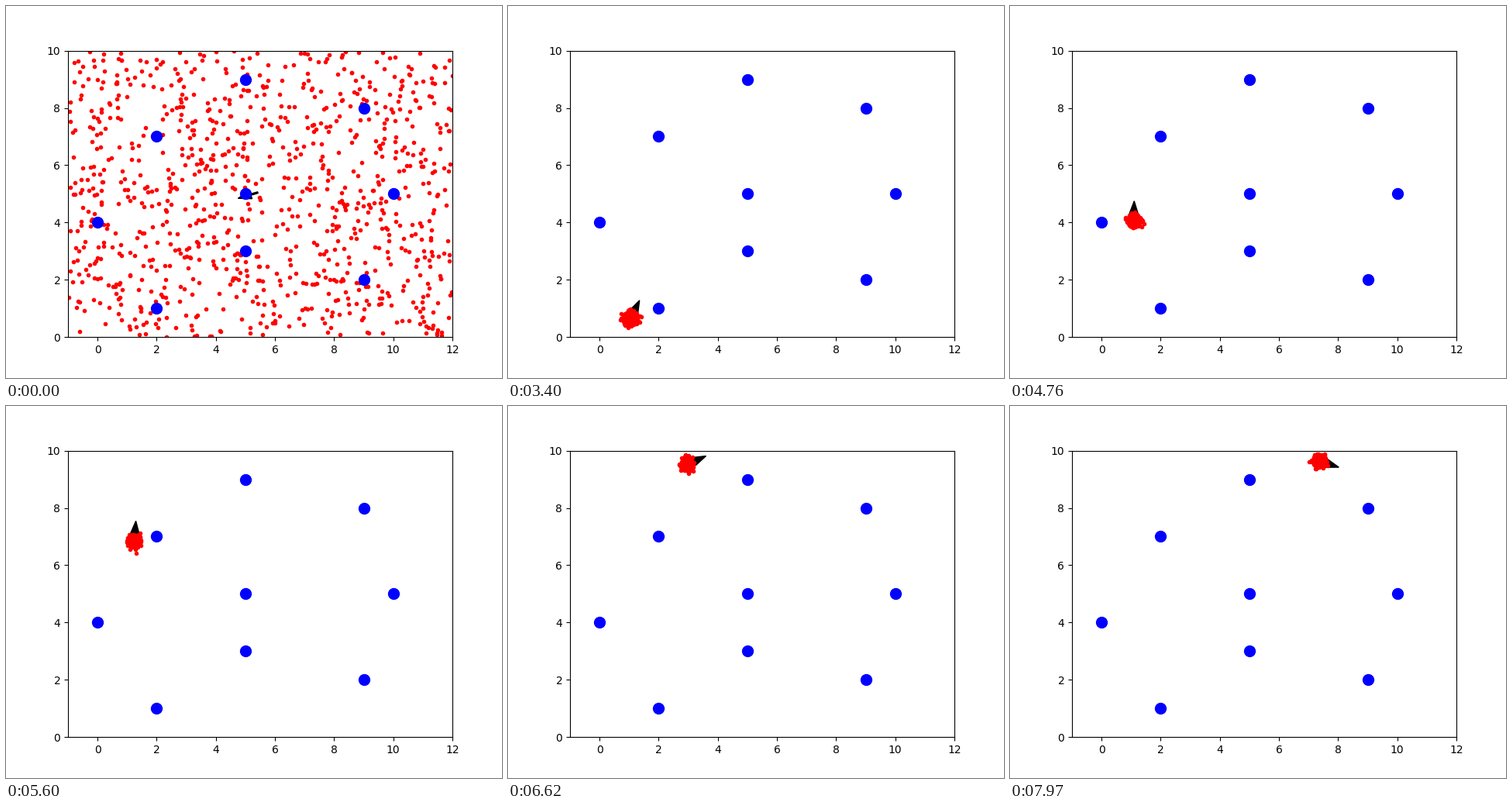
A matplotlib script for the animation above (8 s loop, 640 px wide and 480 px high).

```python
import numpy as np
import matplotlib.pyplot as plt
from matplotlib.animation import FuncAnimation

TICK, LOOP = 20, 8000
LANDMARKS = [(0, 4), (2, 7), (2, 1), (5, 3), (5, 5), (5, 9), (9, 8), (9, 2), (10, 5)]

# The filter steps slowly at first, then speeds up.
STARTS = np.cumsum(np.repeat([0, 400, 300, 200, 100, 50, 30], [1, 4, 2, 6, 4, 3, 140]))

SETTLED, LOCKED = 4, 12      # steps at which the filter converges, then tracks
LOCK_POINT = np.array([1.05, 0.65])
STARTUP_SHIFT = np.array([5.27, 5.1])
RIVAL = (3.33, 2.15)
LAG = 2                      # the estimated heading trails the motion


def heading(step):
    """Drive north, turn right, then level out along the top (degrees)."""
    return np.interp(step, [SETTLED, LOCKED, 79, 105, 153], [-15, 91, 85, 26, -20])


def direction(degrees):
    return np.array([np.cos(np.radians(degrees)), np.sin(np.radians(degrees))])


# Integrate the motion from the heading, one move per step.
moves = np.arange(len(STARTS))
speed = np.where(moves < LOCKED, 0.165, 0.1) * (moves >= SETTLED)
path = np.cumsum(speed * direction(heading(moves + 0.5)), axis=1).T
path = np.vstack([np.zeros(2), path])
path += LOCK_POINT - path[LOCKED]


def startup(step):
    """How far the estimate still is from converging, from 1 down to 0."""
    return max(0, 1 - step / SETTLED) ** 2


def particles(step):
    rng = np.random.default_rng(step + 7)
    if step == 0:
        return rng.uniform((-1, 0), (12, 10), (960, 2))
    spread = 0.1 + 0.06 * 0.85 ** max(0, step - SETTLED)
    clouds = [rng.normal(path[step], spread, (320, 2))]
    for _ in range(20 >> step):
        center = rng.normal(RIVAL, 2 * startup(step))
        clouds.append(rng.normal(center, 0.13, (25, 2)))
    return np.vstack(clouds)


fig, ax = plt.subplots(figsize=(6.4, 4.8), dpi=100)
ax.set(xlim=(-1, 12), ylim=(0, 10))
arrow = ax.arrow(0, 0, 1, 0, width=0.05, head_width=0.3, head_length=0.45, color="k")
cloud, = ax.plot([], [], "r.")
ax.plot(*zip(*LANDMARKS), "bo", markersize=10)


def update(frame):
    time = frame * TICK + TICK / 2
    step = int(np.searchsorted(STARTS, time, "right")) - 1
    x, y = path[step] + startup(step) * STARTUP_SHIFT
    dx, dy = 0.25 * direction(heading(step - LAG) - 148 * startup(step))
    arrow.set_data(x=x, y=y, dx=dx, dy=dy)
    cloud.set_data(*particles(step).T)
    return arrow, cloud


anim = FuncAnimation(fig, update, frames=LOOP // TICK, interval=TICK,
                     repeat=True, repeat_delay=0)
plt.show()
```
